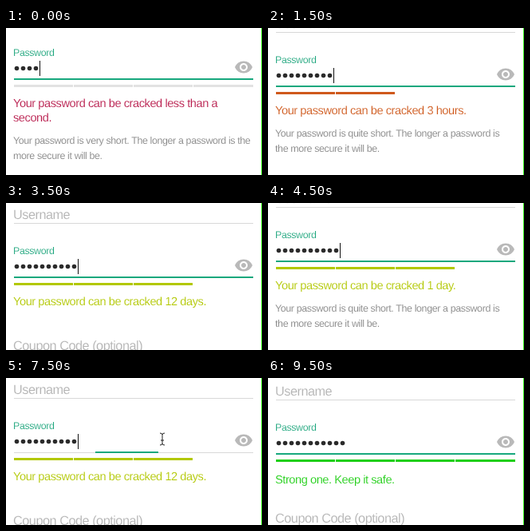
An HTML page that plays this animation: 321 by 184 pixels, repeating every 10000 ms.

```html
<!DOCTYPE html>
<html lang="en">
<head>
<meta charset="utf-8">
<title>Password strength field</title>
<style>
html, body { margin: 0; width: 100%; height: 100%; overflow: hidden; background: #fff; }
svg { display: block; width: 321px; height: 184px; }
/* a hairline white stroke thins the letters to a lighter weight */
text { font-family: "Liberation Sans", Arial, sans-serif; letter-spacing: -.03em; stroke: #fff; stroke-width: .12px; text-rendering: geometricPrecision; }
.hint { font-size: 16.3px; fill: #b4b4b4; }
.label { font-size: 12.4px; fill: #1ea67d; }
.msg { font-size: 14.6px; }
.note { font-size: 12.45px; fill: #858585; }
.plain { font-family: Lato, "Open Sans", sans-serif; font-size: 15px; letter-spacing: .6px; fill: #222; stroke: none; }
</style>
</head>
<body>
<svg id="stage" viewBox="0 0 321 184" xmlns="http://www.w3.org/2000/svg"></svg>
<script>
const STEP = 500;
const TEAL = '#17a87d', RED = '#b81a4b', ORANGE = '#cf591c', YELLOW = '#b2c800', GREEN = '#20cf16';
const CRACK = 'Your password can be cracked ';
const EYE = 'M12 4.5C7 4.5 2.73 7.61 1 12c1.73 4.39 6 7.5 11 7.5s9.27-3.11 11-7.5c-1.73-4.39-6-7.5-11-7.5z' +
  'M12 17c-2.76 0-5-2.24-5-5s2.24-5 5-5 5 2.24 5 5-2.24 5-5 5zm0-8c-1.66 0-3 1.34-3 3s1.34 3 3 3 3-1.34 3-3-1.34-3-3-3z';
const HAND = 'M2.5 1.5Q4.3 .5 4.8 2.3V6.5Q6.8 5.6 7.3 7Q9.2 6.2 9.7 7.8Q11.8 7.2 12 9.2V12.5L10.8 15.5V17.5H4.5V15.8L.8 11.5Q-.4 9.3 1.9 9.6L2.4 10.3V2Z';
const VERY = ['Your password is very short. The longer a password is the', 'more secure it will be.'];
const QUITE = ['Your password is quite short. The longer a password is', 'the more secure it will be.'];

// y is the height of the field's underline; everything else hangs off it
const instant = { y: 64, dots: 4, color: RED, bars: 0, msg: [CRACK + 'less than a', 'second.'], note: VERY, caret: true };
const seconds = { y: 73, dots: 6, color: RED, bars: 1, msg: [CRACK + '2 seconds.'], note: VERY, caret: true };
const minutes = { ...seconds, dots: 8, msg: [CRACK + '19 minutes.'], note: QUITE };
const hours = { ...minutes, dots: 9, color: ORANGE, bars: 2, msg: [CRACK + '3 hours.'] };
const day = { ...hours, dots: 10, color: YELLOW, bars: 3, msg: [CRACK + '1 day.'] };
const days = { y: 93, dots: 10, color: YELLOW, bars: 3, msg: [CRACK + '12 days.'], coupon: 184, caret: true };
const strong = { y: 95, dots: 11, color: GREEN, bars: 4, msg: ['Strong one. Keep it safe.'], drop: 2, coupon: 181 };
const strongOn = { ...strong, caret: true };
const hover = { ...days, caret: false, hand: true };
const shown = { ...hover, plain: 'LoremS@4f!', line: [0, 0] };
const aside = { ...shown, hand: false, beam: 277 };
const refocus = { ...days, line: [112, 191], beam: 196 };

const timeline = [
  instant, seconds, minutes, hours, days, strong, strongOn, days, hours, day,
  days, hover, shown, aside, shown, refocus, strongOn, strong, strongOn, strong
];

const rect = (x, y, w, h, fill) => `<rect x="${x}" y="${y}" width="${w}" height="${h}" fill="${fill}"/>`;
const text = (cls, y, s, fill) =>
  `<text class="${cls}" x="9" y="${y}"${fill ? ` style="fill:${fill}"` : ''}>${s}</text>`;

function meter({ y, bars, color }) {
  let out = '';
  for (let i = 0; i < 4; i++) {
    const fill = i < bars ? color : bars ? '' : '#e2e2e2';
    if (fill) out += rect(10 + 75 * i, y + 7, i === 3 ? 75 : 74, 3, fill);
  }
  return out;
}

function eye({ y, plain, hand }) {
  const color = hand ? '#777' : '#b9b9b9';
  const slash = (dy, stroke) => `<path d="M2.5 ${4 + dy}L19.5 ${21 + dy}" stroke="${stroke}" stroke-width="2"/>`;
  return `<g transform="translate(286 ${y - 27})"><path d="${EYE}" fill="${color}"/>` +
    (plain ? slash(-2.5, '#fff') + slash(0, color) : '') + '</g>';
}

function pointer({ y, hand, beam }) {
  if (hand) return `<path transform="translate(299.5 ${y - 17})" d="${HAND}" fill="#fff" stroke="#111" stroke-width="1.2"/>` +
    `<path d="M306 ${y - 5}v4m2-4v4" stroke="#111" stroke-width=".7"/>`;
  if (beam) return `<path d="M${beam - 3} ${y - 24}q3 0 3 2q0-2 3-2m-3 2v11m-3 2q3 0 3-2q0 2 3 2m-5-6h4" fill="none" stroke="#222"/>`;
  return '';
}

function value({ y, dots, plain, caret }) {
  if (plain) return text('plain', y - 8.5, plain);
  let out = '';
  for (let i = 0; i < dots; i++) out += `<circle cx="${13.5 + 8 * i}" cy="${y - 13.5}" r="2.8" fill="#2b2b2b"/>`;
  return out + (caret ? rect(10 + 8 * dots, y - 23, 1, 19, '#111') : '');
}

function render(s) {
  const { y, line = [10, 310], drop = 0, note = [], coupon } = s;
  const noteTop = y + 63 + 18 * (s.msg.length - 1);
  return text('hint', y - 73, 'Username') +
    rect(10, y - 68, 300, 1, '#d8d8d8') +
    text('label', y - 29, 'Password') +
    rect(10, y, 300, 1, '#d8d8d8') +
    rect(line[0], y - 1, line[1] - line[0], 2, TEAL) +
    value(s) + eye(s) + meter(s) +
    s.msg.map((m, i) => text('msg', y + 35 + drop + 18 * i, m, s.color)).join('') +
    note.map((n, i) => text('note', noteTop + 19 * i, n)).join('') +
    (coupon ? text('hint', coupon, 'Coupon Code (optional)') : '') +
    pointer(s) + rect(320, 0, 1, 184, '#38f21c');
}

const stage = document.getElementById('stage');
const start = performance.now();
let current = null;

function tick() {
  const t = performance.now() - start;
  const state = timeline[Math.floor(t / STEP) % timeline.length];
  if (state !== current) {
    current = state;
    stage.innerHTML = render(state);
  }
  requestAnimationFrame(tick);
}
tick();
</script>
</body>
</html>
```
